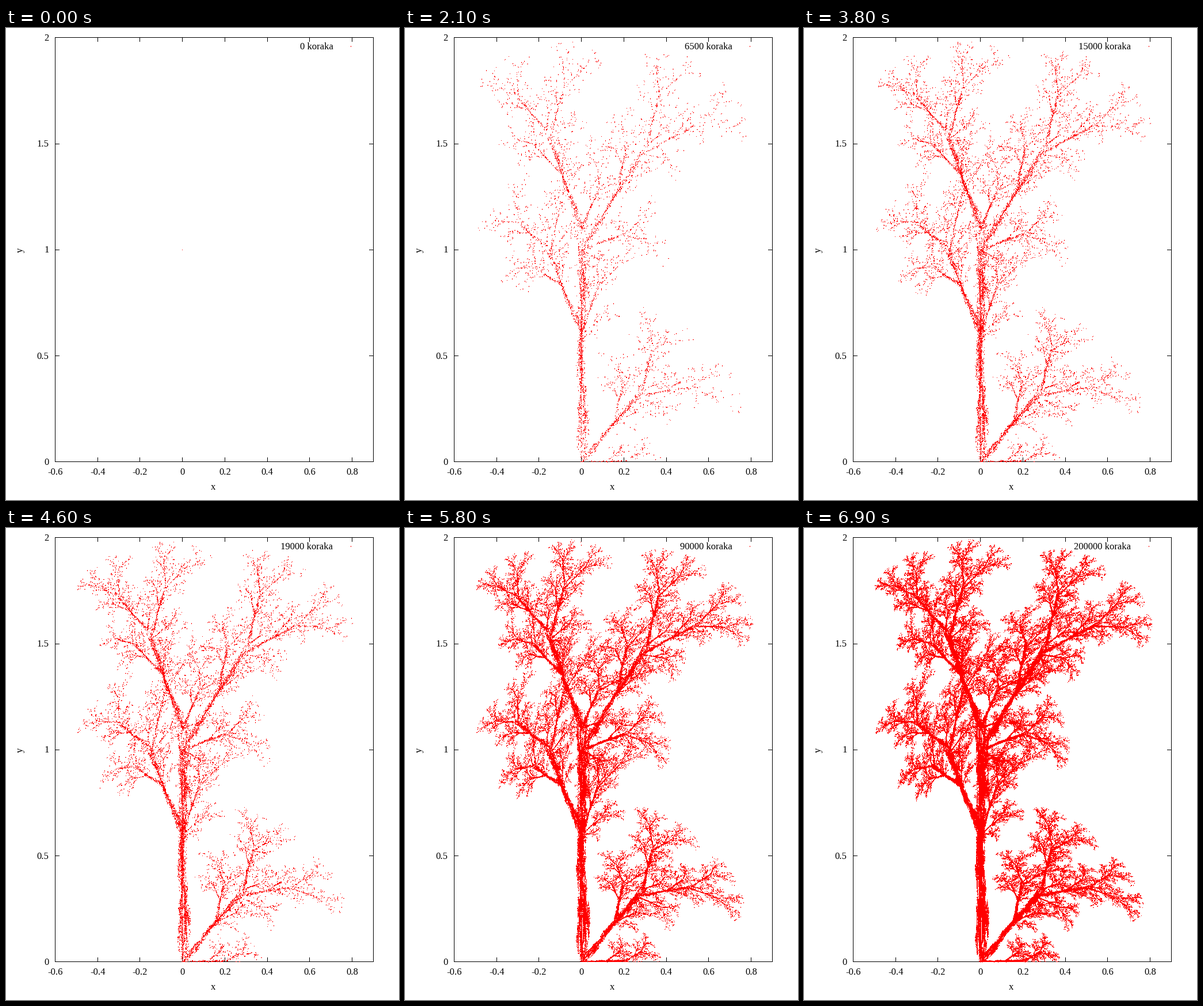
Recreate the animation shown at these times as a matplotlib script. Size 683 by 820 pixels, loop 7000 ms.

```python
import random

import matplotlib.pyplot as plt
import numpy as np
from matplotlib.animation import FuncAnimation

W, H, DPI = 683, 820, 80
LEFT, RIGHT, TOP, BOTTOM = 85.5, 638.5, 16.8, 753.8
X_MIN, X_MAX, Y_MAX = -0.6, 0.9, 2.0
FRAMES = 70
MAX_STEPS = 200000
TICK = 7

# Affine maps (a, b, c, d, shift): x' = a*x + b*y, y' = c*x + d*y + shift
MAPS = [
    (0.05, 0, 0, 0.6, 0),
    (0.05, 0, 0, -0.5, 1.0),
    (0.46, -0.15, 0.39, 0.38, 0.6),
    (0.47, -0.15, 0.17, 0.42, 1.1),
    (0.43, 0.28, -0.25, 0.45, 1.0),
    (0.42, 0.26, -0.35, 0.31, 0),
]
WEIGHTS = [1, 1, 2, 2, 2, 2]

plt.rcParams["font.family"] = "Liberation Serif"
plt.rcParams["font.size"] = 15


def to_px(x):
    return LEFT + (x - X_MIN) * (RIGHT - LEFT) / (X_MAX - X_MIN)


def to_py(y):
    return BOTTOM - y * (BOTTOM - TOP) / Y_MAX


def step_count(frame):
    """Number of steps, growing faster in four stages."""
    return int(np.interp(frame, [0, 10, 48, 54, 69],
                         [0, 1000, 20000, 50000, MAX_STEPS]))


def chaos_game():
    rng = random.Random(7)
    x, y = 0.0, 1.0
    points = [(x, y)]
    for a, b, c, d, shift in rng.choices(MAPS, WEIGHTS, k=MAX_STEPS):
        x, y = a * x + b * y, c * x + d * y + shift
        points.append((x, y))
    return np.array(points)


def first_hits(points):
    """For every pixel, the step at which a dot first covers it."""
    hits = np.full((H, W), MAX_STEPS + 1)
    steps = np.flatnonzero(points[:, 1] >= 0)
    px, py = to_px(points[steps, 0]), to_py(points[steps, 1])
    # A dot is a short, slightly slanted stroke of one or two pixels.
    for dx, dy in ((-0.1, 0.22), (0.1, -0.22)):
        cell = (py + dy).astype(int), (px + dx).astype(int)
        np.minimum.at(hits, cell, steps)
    return hits


def line(x0, y0, x1, y1):
    """Black one-pixel line through pixel centres."""
    xs = np.floor([x0, x1]) + 0.5
    ys = np.floor([y0, y1]) + 0.5
    ax.plot(xs, ys, color="black", lw=72 / DPI, snap=False,
            solid_capstyle="projecting", antialiased=False)


def draw_axes():
    for py in (TOP, BOTTOM):
        line(LEFT, py, RIGHT, py)
    for px in (LEFT, RIGHT):
        line(px, TOP, px, BOTTOM)
    for i in range(-3, 5):
        px = to_px(i / 5)
        if i > -3:
            line(px, TOP, px, TOP + TICK)
            line(px, BOTTOM, px, BOTTOM - TICK)
        ax.text(px, 776, f"{i / 5:g}", ha="center", va="baseline")
    for i in range(5):
        py = to_py(i / 2)
        if 0 < i < 4:
            line(LEFT, py, LEFT + TICK, py)
            line(RIGHT, py, RIGHT - TICK, py)
        ax.text(74.5, py + 5.2, f"{i / 2:g}", ha="right", va="baseline")
    ax.text(360, 802.5, "x", ha="center", va="baseline")
    ax.text(25, 386, "y", rotation=90, ha="center", va="center")


fig = plt.figure(figsize=(W / DPI, H / DPI), dpi=DPI, facecolor="white")
ax = fig.add_axes([0, 0, 1, 1])
draw_axes()

hits = first_hits(chaos_game())
hits[31:33, 599] = 0  # key sample
pixels = np.zeros((H, W, 4), dtype=np.uint8)
pixels[..., 0] = 255
dots = ax.imshow(pixels, extent=(0, W, H, 0), aspect="auto",
                 interpolation="nearest", zorder=5)
label = ax.text(568.3, 37, "", ha="right", va="baseline")
ax.set_xlim(0, W)
ax.set_ylim(H, 0)
ax.axis("off")


def update(frame):
    steps = step_count(frame)
    pixels[..., 3] = np.where(hits <= steps, 255, 0)
    dots.set_data(pixels)
    label.set_text(f"{steps} koraka")
    return dots, label


anim = FuncAnimation(fig, update, frames=FRAMES, interval=100, repeat=True)
plt.show()
```
